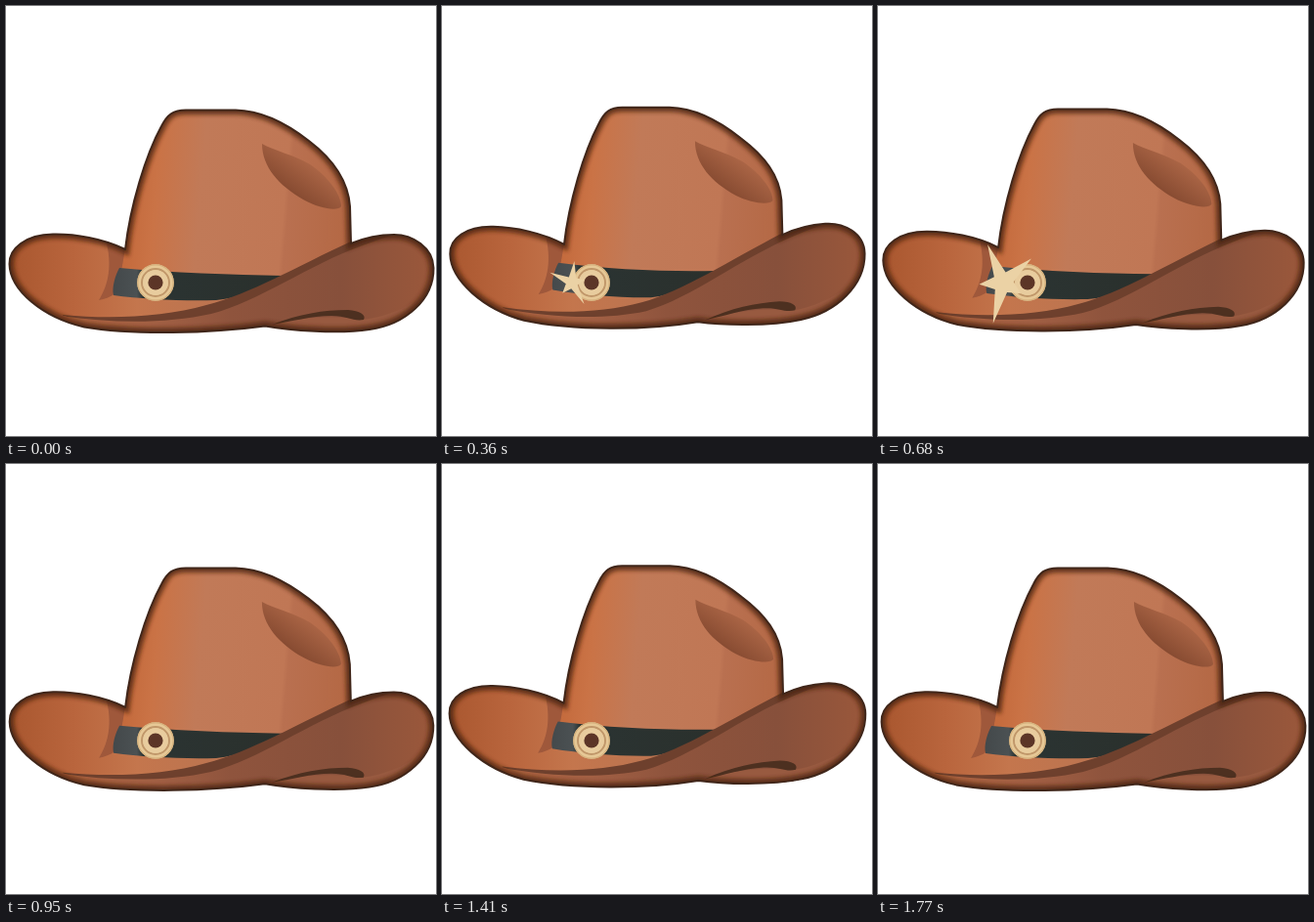
An HTML page that plays this animation: 440x440 px, repeating every 1.81 s.

```html
<!DOCTYPE html>
<html lang="en">
<head>
<meta charset="utf-8">
<title>Hat</title>
<style>
  html, body { margin: 0; width: 100%; height: 100%; overflow: hidden; background: #fff; }
  svg { display: block; width: 100vw; height: 100vh; }
</style>
</head>
<body>
<svg viewBox="0 0 440 440">
  <defs>
    <linearGradient id="brimIn" gradientUnits="userSpaceOnUse" x1="5" y1="0" x2="220" y2="0">
      <stop offset="0" stop-color="#a9572f"/>
      <stop offset=".3" stop-color="#b9653d"/>
      <stop offset=".6" stop-color="#c4764d"/>
      <stop offset="1" stop-color="#bb7450"/>
    </linearGradient>
    <linearGradient id="crown" gradientUnits="userSpaceOnUse" x1="122" y1="170" x2="353" y2="190">
      <stop offset="0" stop-color="#c2683a"/>
      <stop offset=".14" stop-color="#ca7346"/>
      <stop offset=".34" stop-color="#c17a58"/>
      <stop offset=".71" stop-color="#c07755"/>
      <stop offset=".73" stop-color="#b97050"/>
      <stop offset="1" stop-color="#b46844"/>
    </linearGradient>
    <linearGradient id="crease" gradientUnits="userSpaceOnUse" x1="289" y1="193" x2="317" y2="154">
      <stop offset="0" stop-color="#83482f"/>
      <stop offset="1" stop-color="#b46c4b"/>
    </linearGradient>
    <linearGradient id="band" gradientUnits="userSpaceOnUse" x1="108" y1="0" x2="280" y2="0">
      <stop offset="0" stop-color="#43484a"/>
      <stop offset=".15" stop-color="#4b5153"/>
      <stop offset=".19" stop-color="#2b3433"/>
      <stop offset="1" stop-color="#2a302c"/>
    </linearGradient>
    <linearGradient id="front" gradientUnits="userSpaceOnUse" x1="60" y1="0" x2="437" y2="0">
      <stop offset="0" stop-color="#ad633f"/>
      <stop offset=".25" stop-color="#a26044"/>
      <stop offset=".45" stop-color="#8f543d"/>
      <stop offset=".75" stop-color="#87503b"/>
      <stop offset="1" stop-color="#9b583b"/>
    </linearGradient>
    <filter id="soft" filterUnits="userSpaceOnUse" x="0" y="90" width="440" height="260">
      <feGaussianBlur stdDeviation="2.2"/>
    </filter>
    <clipPath id="shape"><path class="edge"/></clipPath>
  </defs>

  <g clip-path="url(#shape)">
    <path class="edge" fill="url(#brimIn)"/>
    <path fill="#9f583b" d="M102,239 C109,265 105,285 95,301 C101,300 106,298 112,294 L124,248 Z"/>
    <path fill="url(#crown)" d="M122,248 C127,205 143,150 160,120 C165,109 172,100 180,100 L235,100 L310,100 L370,150 L370,250 L275,282 L118,272 Z"/>
    <path fill="url(#crease)" d="M262,141 C274,148 294,152 311,162 C330,175 343,193 343,205 C340,210 322,208 304,198 C280,184 262,165 262,141 Z"/>
    <path fill="url(#band)" d="M116,268 C170,273 230,275 284,276 C262,288 240,299 215,301 C180,302 140,300 110,296 C108,288 112,275 116,268 Z"/>
    <path fill="#6e402d" d="M58,316 C110,321 162,318 205,306 C250,295 298,266 353,241 L400,228 L440,240 L440,340 L60,340 Z"/>
    <path fill="url(#front)" d="M56,317 C110,325 165,325 210,315 C258,303 309,265 365,245 C378,240 390,236 400,233 L445,240 L445,345 L60,345 L0,300 Z"/>
    <path fill="url(#brimIn)" d="M0,300 L0,345 L80,345 C85,330 72,320 56,316 Z"/>
    <path fill="#985a40" d="M264,327 C295,320 330,315 364,321 C385,319 402,312 418,302 C405,325 380,340 330,340 Z"/>
    <path fill="#4d3020" d="M272,326 C300,315 325,311 350,311 C362,312 369,316 366,321 C355,323 350,317 333,317 C312,317 292,323 272,326 Z"/>
    <path class="edge" fill="none" stroke="#48230f" stroke-width="9" opacity=".78" filter="url(#soft)"/>
  </g>
  <path class="edge" fill="none" stroke="#40261a" stroke-width="2" stroke-linejoin="round"/>

  <g transform="translate(153 283)">
    <circle r="18.8" fill="#e6c896"/>
    <circle r="18.2" fill="none" stroke="#d6b27e" stroke-width="1.2"/>
    <circle r="14" fill="none" stroke="#c0976a" stroke-width="2"/>
    <circle r="12.8" fill="#e8cc9e"/>
    <circle r="7.6" fill="#5c3527"/>
  </g>
  <path id="star" fill="#ebd2a5"/>
</svg>
<script>
  const LOOP = 1810, FRAMES = 40, STEP = LOOP / FRAMES;
  const EDGE = 'M122,249 C127,205 143,152 159,123 C165,111 171,106.5 184,106.5 L235,106.5 ' +
    'C262,107 287,120 310,138 C335,157 350,178 352,205 L353,243 C365,238 378,234 397,234 ' +
    'C416,234 437,247 437.5,268 C438,300 409,326 372,331 C340,336 290,332 265,327.5 ' +
    'C210,335 130,337 80,328.5 C38,319 4,291 3.5,264 C3,248 20,234 48,233.5 C70,233 100,238 122,249 Z';
  const RAYS = [.98, .88, .5, 1, .57];

  document.querySelectorAll('.edge').forEach(p => p.setAttribute('d', EDGE));
  const star = document.getElementById('star');
  const parts = [...document.querySelectorAll('path[d]')].map(el => ({ el, d: el.getAttribute('d') }));

  const ease = u => (1 - Math.cos(Math.PI * u)) / 2;
  const clamp = u => Math.min(1, Math.max(0, u));

  // Two bends per loop: quick rise, slower fall.
  function liftAt(frame) {
    const p = frame % 20 / 20;
    return p < .4 ? ease(p / .4) : ease((1 - p) / .6);
  }

  // The brim ends rise and draw inward; the crown only shifts a little.
  function bend(d, k) {
    return d.replace(/([\d.]+),([\d.]+)/g, (_, sx, sy) => {
      const x = +sx, y = +sy;
      const side = Math.abs((x - 215) / 222) ** 1.4 * (x < 215 ? 8 : 12);
      const nx = x - k * 5 * Math.tanh((x - 190) / 100);
      const ny = y - k * (2.7 + side * clamp((y - 150) / 90));
      return nx.toFixed(2) + ',' + ny.toFixed(2);
    });
  }

  function starPath(t) {
    const u = (t - 250) / 650;
    if (u <= 0 || u >= 1) return '';
    const size = 49 * Math.sin(Math.PI * u);
    const cx = 133 - 5 * clamp((t - 360) / 320);
    const turn = -156 + (t - 360) * .1375;
    const at = (deg, r) => {
      const a = deg * Math.PI / 180;
      return (cx + r * Math.cos(a)).toFixed(2) + ',' + (283 + r * Math.sin(a)).toFixed(2);
    };
    const pts = RAYS.flatMap((len, i) => [
      at(turn + 72 * i, size * len),
      at(turn + 72 * i + 36, size * .25)
    ]);
    return 'M' + pts.join('L') + 'Z';
  }

  let last = -1;
  function draw(now) {
    const frame = Math.floor((now % LOOP + 3) / STEP) % FRAMES;
    if (frame !== last) {
      last = frame;
      const k = liftAt(frame);
      parts.forEach(({ el, d }) => el.setAttribute('d', bend(d, k)));
      star.setAttribute('d', starPath(frame * STEP));
    }
  }

  const start = performance.now();
  function tick() {
    draw(performance.now() - start);
    requestAnimationFrame(tick);
  }
  tick();
</script>
</body>
</html>
```
